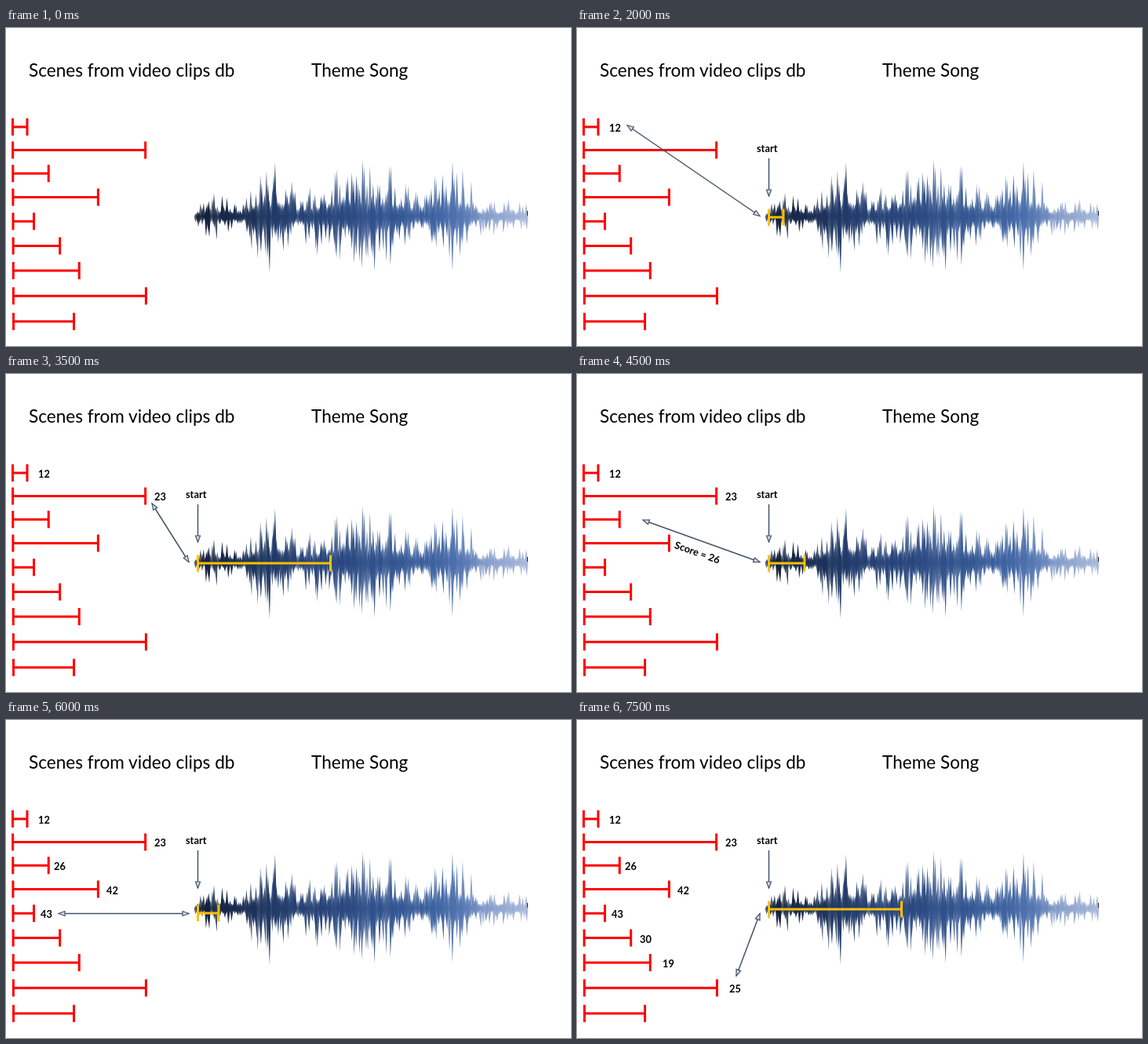
Write an HTML page that moves like this. It is 720 px wide and 405 px high and loops after 8000 ms.

```html
<!DOCTYPE html>
<html lang="en">
<head>
<meta charset="utf-8">
<style>
  html, body { margin: 0; width: 100%; height: 100%; overflow: hidden; background: #fff; }
  svg { display: block; width: 720px; height: 405px; }
  text { font: bold 12.8px Lato, Carlito, sans-serif; }
  .title { font: 22.6px Lato, sans-serif; }
  .mid { text-anchor: middle; }
  .arrow { stroke: #44546a; stroke-width: 1.5; }
  .head { fill: #d5dae2; stroke: #44546a; stroke-width: 1.2; }
  .clip, .match { fill: none; stroke: #f00; stroke-width: 3; }
  .match { stroke: #ffc000; }
</style>
</head>
<body>
<svg viewBox="0 0 720 405">
  <defs>
    <linearGradient id="blue" gradientUnits="userSpaceOnUse" x1="241" y1="0" x2="665" y2="0">
      <stop offset="0" stop-color="#101d36"/>
      <stop offset=".12" stop-color="#182b4e"/>
      <stop offset=".25" stop-color="#213b6b"/>
      <stop offset=".5" stop-color="#2c4c86"/>
      <stop offset=".7" stop-color="#385e9c"/>
      <stop offset=".81" stop-color="#5577b2"/>
      <stop offset=".87" stop-color="#8199c8"/>
      <stop offset="1" stop-color="#a9b9da"/>
    </linearGradient>
  </defs>
  <text class="title" x="29" y="62">Scenes from video clips db</text>
  <text class="title" x="389" y="62">Theme Song</text>
  <g id="wave" fill="url(#blue)"></g>
  <path d="M664.5 233V239" stroke="#222"/>
  <g id="clips"></g>
  <g id="live"></g>
</svg>
<script>
const $ = id => document.getElementById(id);

// The last clip is never compared.
const clips = [
  { width: 18.5, score: 12, textX: 41, from: [64, 124] },
  { width: 169, score: 23, textX: 189, from: [186, 165] },
  { width: 45.5, score: 26, textX: 61, from: [84, 186] },
  { width: 108.5, score: 42, textX: 128, from: [150, 219] },
  { width: 26.5, score: 43, textX: 44, from: [67, 246.5] },
  { width: 59.5, score: 30, textX: 80, from: [102, 277] },
  { width: 84, score: 19, textX: 109, from: [131, 311] },
  { width: 169, score: 25, textX: 194, from: [203, 326] },
  { width: 77 }];

// Rows drift slightly apart down the list.
const rowY = i => 126 + 29.2 * i + .22 * i * i;

const bar = (cls, x, y, w, h) =>
  `<path class="${cls}" d="M${x} ${y - h}v${2 * h}m0 ${-h}h${w}m0 ${-h}v${2 * h}"/>`;

const head = (x, y, deg) =>
  `<path class="head" d="M0 0L-8 -3V3Z" transform="translate(${x} ${y}) rotate(${deg})"/>`;

const angle = ([x1, y1], [x2, y2]) => Math.atan2(y2 - y1, x2 - x1) * 180 / Math.PI;

const arrow = (from, to, both) => {
  const deg = angle(from, to);
  return `<path class="arrow" d="M${from}L${to}"/>` + head(...to, deg) +
    (both ? head(...from, deg + 180) : '');
};

// Loudness of the song: x, height
const loudness = [[241, 19], [268, 34], [303, 18], [318, 62], [348, 82], [372, 34], [400, 54], [448, 76],
  [500, 66], [530, 32], [555, 76], [590, 64], [601, 25], [666, 21]];

const level = x => {
  const i = loudness.findIndex(p => p[0] > x);
  const [[x1, h1], [x2, h2]] = [loudness[i - 1], loudness[i]];
  return h1 + (h2 - h1) * (x - x1) / (x2 - x1);
};

let seed = 11;
const rnd = () => (seed = seed * 16807 % 2147483647) / 2147483647;

// Thin spikes overlap near the axis and leave white notches further out.
function drawWave() {
  let out = '';
  for (let x = 242; x < 664; x += 1.4 + rnd()) {
    const h = level(x);
    const up = 240 - h * (.22 + .78 * rnd() ** 2.2);
    const down = 241 + h * (.2 + .78 * rnd() ** 2.2);
    const lean = rnd() * 3 - 1.5;
    out += `<path d="M${x - 2.4} 240L${x} ${up}L${x + 2.4} 240L${x + lean} ${down}Z" opacity="${.65 + .35 * rnd()}"/>`;
  }
  $('wave').innerHTML = out;
}

// The first three rounds go through compare, score and result; later ones show the result at once.
function drawStep(step) {
  let out = '';
  if (step > 0) out += '<text x="229" y="158">start</text>' + arrow([244.5, 166], [244.5, 214]);
  if (step > 1) {
    const slow = step < 11;
    const n = slow ? Math.floor((step - 2) / 3) : step - 8;
    const phase = slow ? (step - 2) % 3 : 2;
    const { width, score, from } = clips[n];
    const tip = [233, from[1] < 240 ? 239.5 : 246.5];
    out += bar('match', 244.5, n == 4 ? 246 : 241, width, 10.5) + arrow(from, tip, true);
    if (phase < 2) {
      const mid = from.map((v, i) => (v + tip[i]) / 2);
      out += `<text class="mid" y="${n ? 20 : -6}" transform="translate(${mid}) rotate(${angle(from, tip)})">` +
        (phase ? 'Score = ' + score : 'Compare') + '</text>';
    }
    clips.slice(0, phase == 2 ? n + 1 : n).forEach((c, i) => {
      out += `<text x="${c.textX}" y="${rowY(i) + 6}">${c.score}</text>`;
    });
  }
  $('live').innerHTML = out;
}

let shown = -1;
function tick() {
  const step = Math.floor(performance.now() % 8000 / 500);
  if (step != shown) drawStep(shown = step);
  requestAnimationFrame(tick);
}

drawWave();
$('clips').innerHTML = clips.map((c, i) => bar('clip', 8.5 + i * .13, rowY(i), c.width, 11)).join('');
tick();
</script>
</body>
</html>
```
